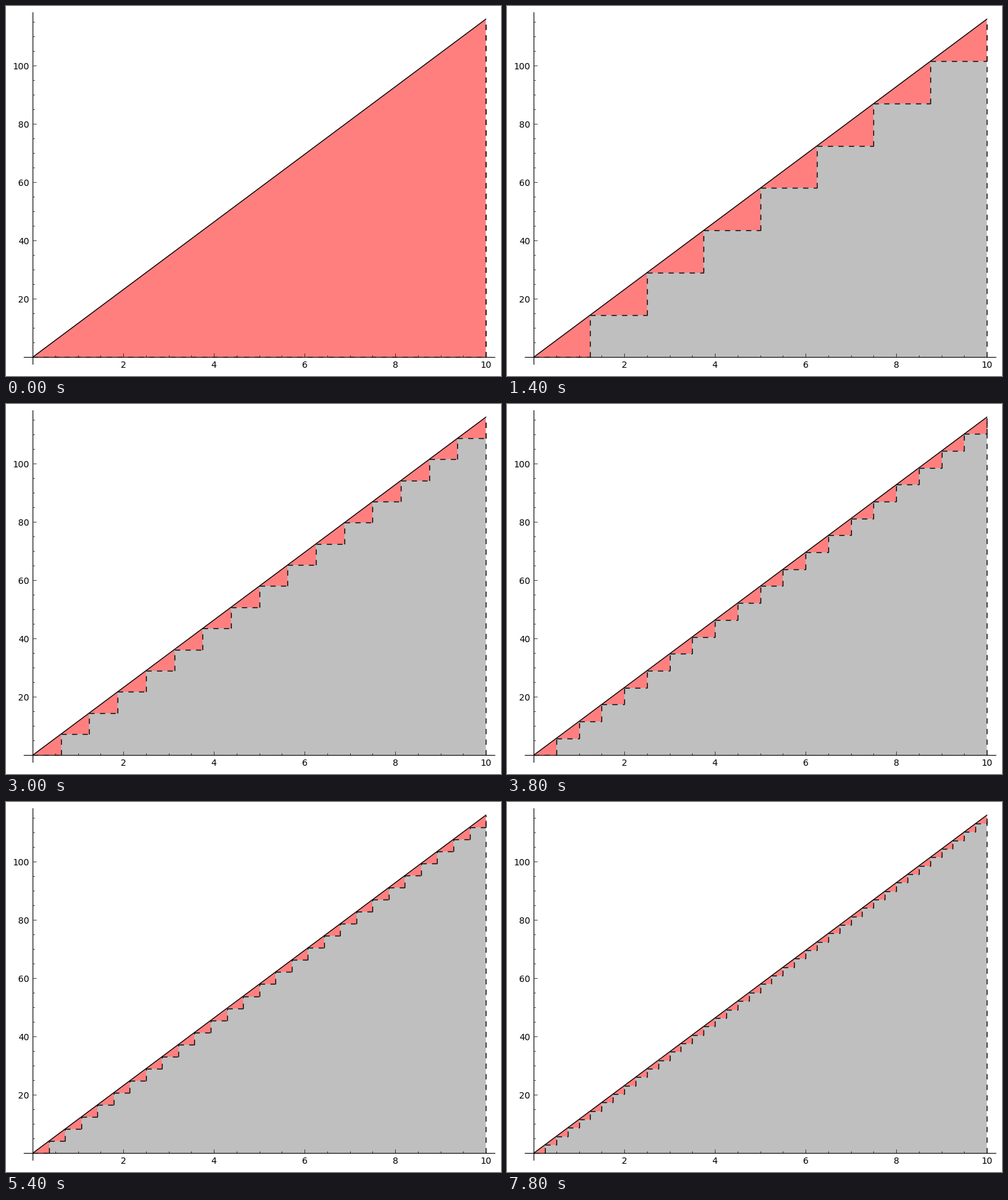
Animation of 781x584 px, one loop 8000 ms. Source, as a matplotlib script:

```python
import matplotlib.pyplot as plt
import numpy as np
from matplotlib.animation import FuncAnimation
from matplotlib.collections import LineCollection, PolyCollection

W, H, DPI = 781, 584, 100
X_MAX, SLOPE = 10, 11.6
Y_MAX = X_MAX * SLOPE
STEPS = 40

# Pixel position of the origin and pixels per data unit
X0, Y0 = 42.1, 554.3
SX, SY = 71.5, 4.6
PAD = 0.02

fig = plt.figure(figsize=(W / DPI, H / DPI), dpi=DPI, facecolor="white")
width = X_MAX * (1 + 2 * PAD) * SX
height = Y_MAX * (1 + 2 * PAD) * SY
left = X0 - X_MAX * PAD * SX
bottom = H - Y0 - Y_MAX * PAD * SY
ax = fig.add_axes([left / W, bottom / H, width / W, height / H])
ax.set_xlim(-PAD * X_MAX, (1 + PAD) * X_MAX)
ax.set_ylim(-PAD * Y_MAX, (1 + PAD) * Y_MAX)
ax.patch.set_visible(False)

for side in ("top", "right"):
    ax.spines[side].set_visible(False)
for side in ("left", "bottom"):
    ax.spines[side].set_position(("data", 0))
    ax.spines[side].set_linewidth(0.8)

ax.set_xticks(range(2, 11, 2))
ax.set_xticks(np.arange(0.5, 10, 0.5), minor=True)
ax.set_yticks(range(20, 101, 20))
ax.set_yticks(range(5, 116, 5), minor=True)
ax.tick_params(which="major", direction="in", length=4, width=0.5, pad=4,
               labelsize=10, labelfontfamily="DejaVu Sans")
ax.tick_params(which="minor", direction="in", length=2, width=0.5)

under = PolyCollection([], facecolors="gray", edgecolors="none", alpha=0.5, zorder=1)
gaps = PolyCollection([], facecolors="red", edgecolors="none", alpha=0.5, zorder=1.1)
dashes = LineCollection([], colors="black", linewidths=1,
                        linestyles=[(0, (6, 6))], zorder=2)
for part in (under, gaps, dashes):
    ax.add_collection(part, autolim=False)
ax.plot([0, X_MAX], [0, Y_MAX], color="black", lw=1, zorder=2.1)


def draw(i):
    n = i + 1
    xs = np.linspace(0, X_MAX, n + 1)
    ys = xs * SLOPE
    stairs, triangles = [(0, 0)], []
    lines = [[(X_MAX, 0), (X_MAX, Y_MAX)]]
    for a, b, fa, fb in zip(xs, xs[1:], ys, ys[1:]):
        stairs += [(a, fa), (b, fa)]
        triangles.append([(a, fa), (b, fa), (b, fb)])
        lines += [[(a, fa), (b, fa)], [(b, fa), (b, fb)]]
    stairs.append((X_MAX, 0))
    under.set_verts([stairs] if n > 1 else [])
    gaps.set_verts(triangles)
    dashes.set_segments(lines)
    return under, gaps, dashes


anim = FuncAnimation(fig, draw, frames=STEPS, interval=200,
                     repeat=True, repeat_delay=0, blit=False)
plt.show()
```
